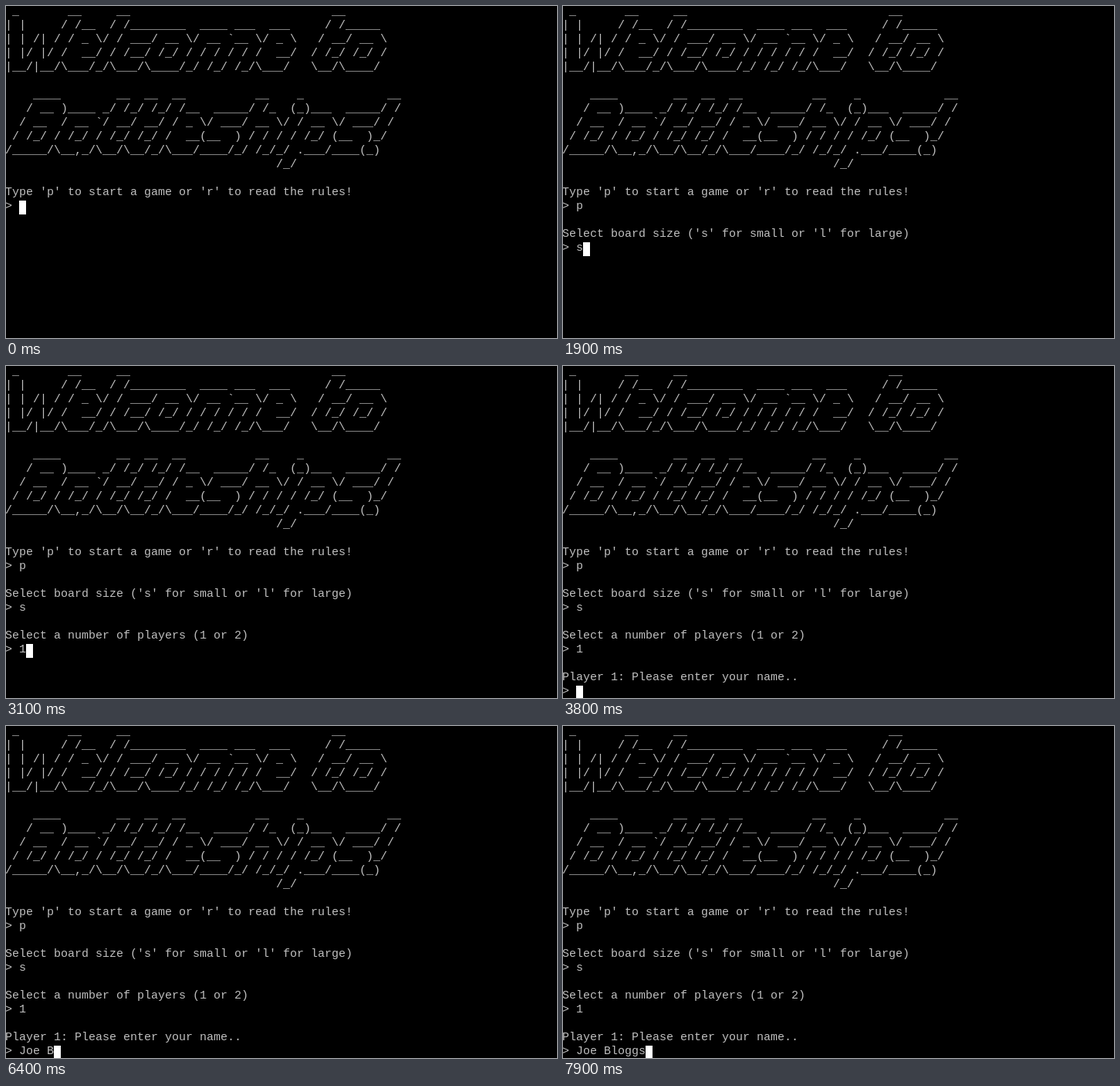
Recreate the animation shown at these times as an HTML page. Size 714 by 430 pixels, loop 8000 ms.

```html
<!DOCTYPE html>
<html lang="en">
<head>
<meta charset="utf-8">
<title>Terminal game</title>
<style>
  html, body { margin: 0; width: 100%; height: 100%; overflow: hidden; background: #000; }
  svg { display: block; }
  text { font: 15px "Liberation Mono", monospace; fill: #bfbfbf; white-space: pre; }
</style>
</head>
<body>
<pre id="banner" hidden>
 _       __     __                             __
| |     / /__  / /________  ____ ___  ___     / /_____
| | /| / / _ \/ / ___/ __ \/ __ `__ \/ _ \   / __/ __ \
| |/ |/ /  __/ / /__/ /_/ / / / / / /  __/  / /_/ /_/ /
|__/|__/\___/_/\___/\____/_/ /_/ /_/\___/   \__/\____/

    ____        __  __  __          __    _            __
   / __ )____ _/ /_/ /_/ /__  _____/ /_  (_)___  _____/ /
  / __  / __ `/ __/ __/ / _ \/ ___/ __ \/ / __ \/ ___/ /
 / /_/ / /_/ / /_/ /_/ /  __(__  ) / / / / /_/ (__  )_/
/_____/\__,_/\__/\__/_/\___/____/_/ /_/_/ .___/____(_)
                                       /_/
</pre>
<svg id="screen" width="714" height="430" viewBox="0 0 714 430"></svg>
<script>
const LOOP = 8000, ROWS = 24;
const CELL_W = 9, CELL_H = 18, LEFT = -1, BASELINE = 11;

// Each step appends its output to the terminal at the given time.
const ask = question => `\n\n${question}\n> `;
const steps = [
  [0, ask("Type 'p' to start a game or 'r' to read the rules!")],
  [800, "p"],
  [900, ask("Select board size ('s' for small or 'l' for large)")],
  [1900, "s"],
  [2500, ask("Select a number of players (1 or 2)")],
  [3100, "1"],
  [3800, ask("Player 1: Please enter your name..")],
  [5400, "J"],
  [5700, "oe"],
  [6200, " "],
  [6400, "B"],
  [7000, "lo"],
  [7700, "gg"],
  [7900, "s"]
];

const screen = document.getElementById("screen");
const banner = document.getElementById("banner").textContent.replace(/\n$/, "");

function add(tag, attrs) {
  const el = document.createElementNS("http://www.w3.org/2000/svg", tag);
  for (const key in attrs) el.setAttribute(key, attrs[key]);
  return screen.appendChild(el);
}

const rows = Array.from({ length: ROWS }, (_, i) =>
  add("text", { x: LEFT, y: i * CELL_H + BASELINE }));
const cursor = add("rect", { width: CELL_W, height: CELL_H, fill: "#fff" });

let shown = null;

function render(time) {
  const output = banner + steps.filter(([at]) => at <= time).map(([, text]) => text).join("");
  if (output === shown) return;
  shown = output;
  const lines = output.split("\n");
  rows.forEach((row, i) => { row.textContent = lines[i] || ""; });
  const last = lines.length - 1;
  cursor.setAttribute("x", LEFT + lines[last].length * CELL_W);
  cursor.setAttribute("y", last * CELL_H);
}

const start = performance.now();
function tick() {
  render((performance.now() - start) % LOOP);
  requestAnimationFrame(tick);
}
tick();
</script>
</body>
</html>
```
